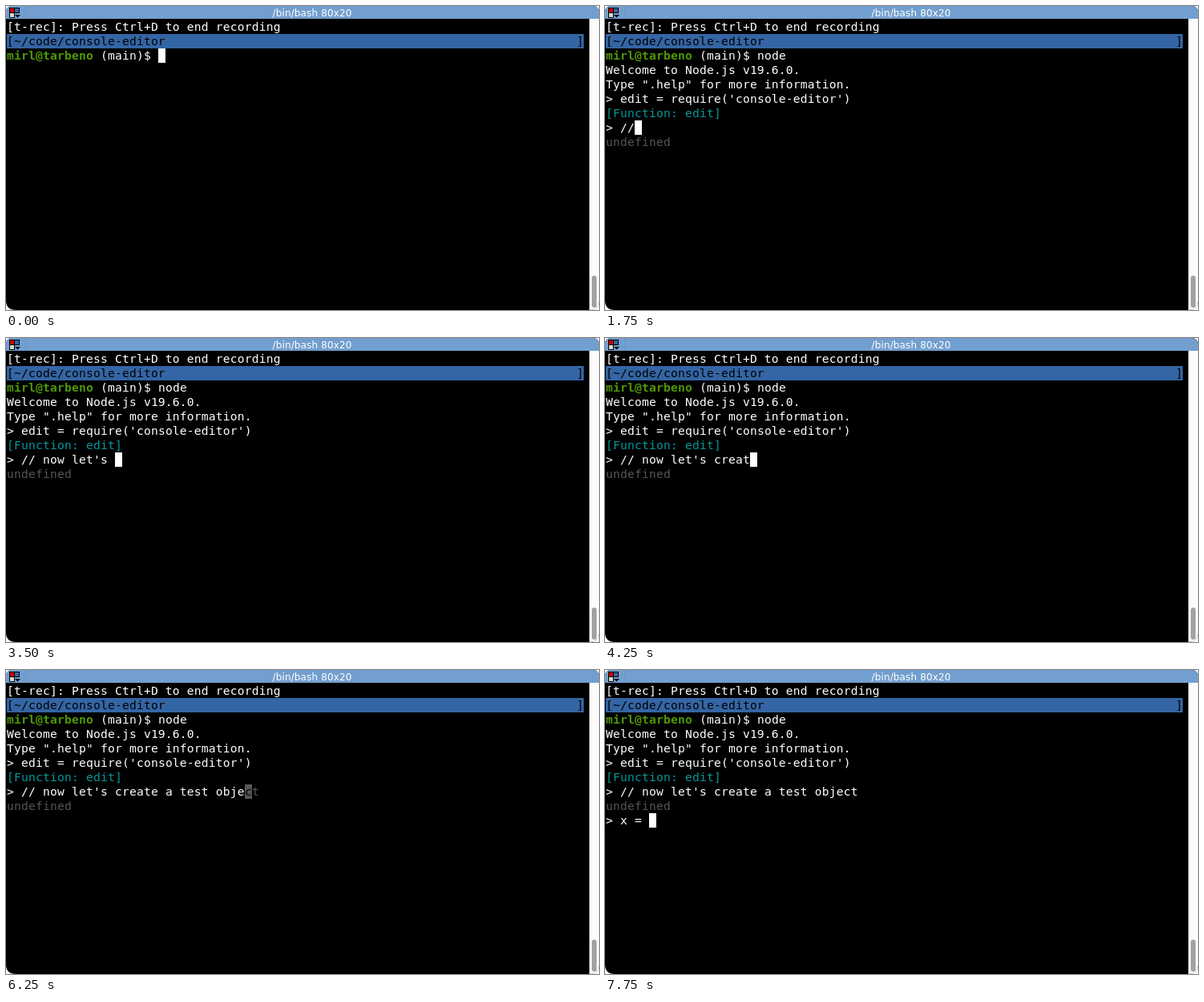
An HTML page that plays this animation: 740x380 px, repeating every 8000 ms.

```html
<!DOCTYPE html>
<html lang="en">
<head>
<meta charset="utf-8">
<title>Terminal session</title>
<style>
  html, body { margin: 0; width: 100%; height: 100%; overflow: hidden; background: #fff; }
  svg { display: block; }
  text { white-space: pre; }
  .term text { font: 14.667px "DejaVu Sans Mono", monospace; letter-spacing: 0.17px; }
  .term text.bold { font-weight: bold; }
  .title { font: 12px "DejaVu Sans", sans-serif; letter-spacing: 0.13px; }
</style>
</head>
<body>
<svg width="740" height="380" viewBox="0 0 740 380">
  <defs>
    <clipPath id="win"><path d="M0 8Q0 0 8 0H732Q740 0 740 8V368Q740 380 728 380H12Q0 380 0 368Z"/></clipPath>
  </defs>
  <g clip-path="url(#win)">
    <rect width="740" height="380" fill="#000"/>
    <rect width="740" height="16" fill="#729fcf"/>
    <g stroke="#000" stroke-width="1">
      <rect x="4.5" y="2.5" width="6" height="6" fill="#c00"/>
      <rect x="10.5" y="2.5" width="6" height="6" fill="#3465a4"/>
      <rect x="4.5" y="8.5" width="6" height="6" fill="#d3d7cf"/>
    </g>
    <path d="M11 11H18L14.5 14.5Z"/>
    <path d="M24.5 1V16" stroke="#5581b0" stroke-dasharray="1 2"/>
    <text class="title" x="382" y="13" text-anchor="middle" fill="#fff">/bin/bash 80x20</text>
    <rect x="728" y="16" width="12" height="364" fill="#fcfcfc"/>
    <rect x="731" y="337" width="6" height="40" rx="3" fill="#a2a2a2"/>
    <g class="term" id="screen"></g>
  </g>
</svg>
<script>
(() => {
  const NS = "http://www.w3.org/2000/svg";
  const screenEl = document.getElementById("screen");
  const CELL = 9, LINE = 18, STEP = 250, LOOP = 8000;
  const WHITE = "#fff", BLACK = "#000", BLUE = "#3465a4", GREEN = "#4e9a06", CYAN = "#06989a", GREY = "#555753";

  const COMMENT = "// now let's create a test object";
  const COMMENT_START = 6;
  // characters of the comment typed at each step
  const TYPED = [1, 2, 3, 5, 7, 9, 10, 11, 13, 14, 16, 18, 19, 20, 22, 24, 26, 27, 29, 31, 32, 33];
  const ENTERED = COMMENT_START + TYPED.length;
  const ASSIGN = ["", "x", "x ", "x = "];

  const colX = col => 1 + col * CELL;
  const rowY = row => 17 + row * LINE;

  function add(tag, attrs) {
    const el = document.createElementNS(NS, tag);
    for (const k in attrs) el.setAttribute(k, attrs[k]);
    return screenEl.appendChild(el);
  }

  function fill(row, col, width, color) {
    add("rect", { x: colX(col), y: rowY(row), width: width * CELL, height: LINE, fill: color });
  }

  function write(row, col, str, color = WHITE, cls = "") {
    if (str) add("text", { x: colX(col), y: rowY(row) + 14, fill: color, class: cls }).textContent = str;
  }

  // Input line with its cursor; a suggestion starts under the cursor.
  function input(row, col, str, hint = "") {
    const end = col + str.length;
    write(row, col, str);
    fill(row, end, 1, hint ? GREY : WHITE);
    if (hint) {
      write(row, end, hint[0], BLACK);
      write(row, end + 1, hint.slice(1), GREY);
    }
  }

  function suggestion(n) {
    if (n === 9) return "t";
    return n >= 29 ? COMMENT.slice(n) : "";
  }

  function draw(step) {
    screenEl.replaceChildren();
    write(0, 0, "[t-rec]: Press Ctrl+D to end recording");
    fill(1, 0, 80, BLUE);
    write(1, 0, "[~/code/console-editor", BLACK);
    write(1, 79, "]", BLACK);
    write(2, 0, "mirl@tarbeno", GREEN, "bold");
    write(2, 13, "(main)$");
    if (step < 3) return input(2, 21, "node".slice(0, step * 2));

    write(2, 21, "node");
    write(3, 0, "Welcome to Node.js v19.6.0.");
    write(4, 0, 'Type ".help" for more information.');
    write(5, 0, ">");
    const call = "edit = require('console-editor')";
    if (step < 5) return input(5, 2, step < 4 ? "" : call);

    write(5, 2, call);
    write(6, 0, "[Function: edit]", CYAN);
    write(7, 0, ">");
    if (step < COMMENT_START) return input(7, 2, "");

    if (step > COMMENT_START) write(8, 0, "undefined", GREY);
    if (step < ENTERED) {
      const n = TYPED[step - COMMENT_START];
      return input(7, 2, COMMENT.slice(0, n), suggestion(n));
    }

    write(7, 2, COMMENT);
    write(9, 0, ">");
    input(9, 2, ASSIGN[step - ENTERED]);
  }

  let shown = -1;
  const began = performance.now();

  function tick() {
    const step = Math.floor(((performance.now() - began) % LOOP) / STEP);
    if (step !== shown) draw(shown = step);
    requestAnimationFrame(tick);
  }
  tick();
})();
</script>
</body>
</html>
```
